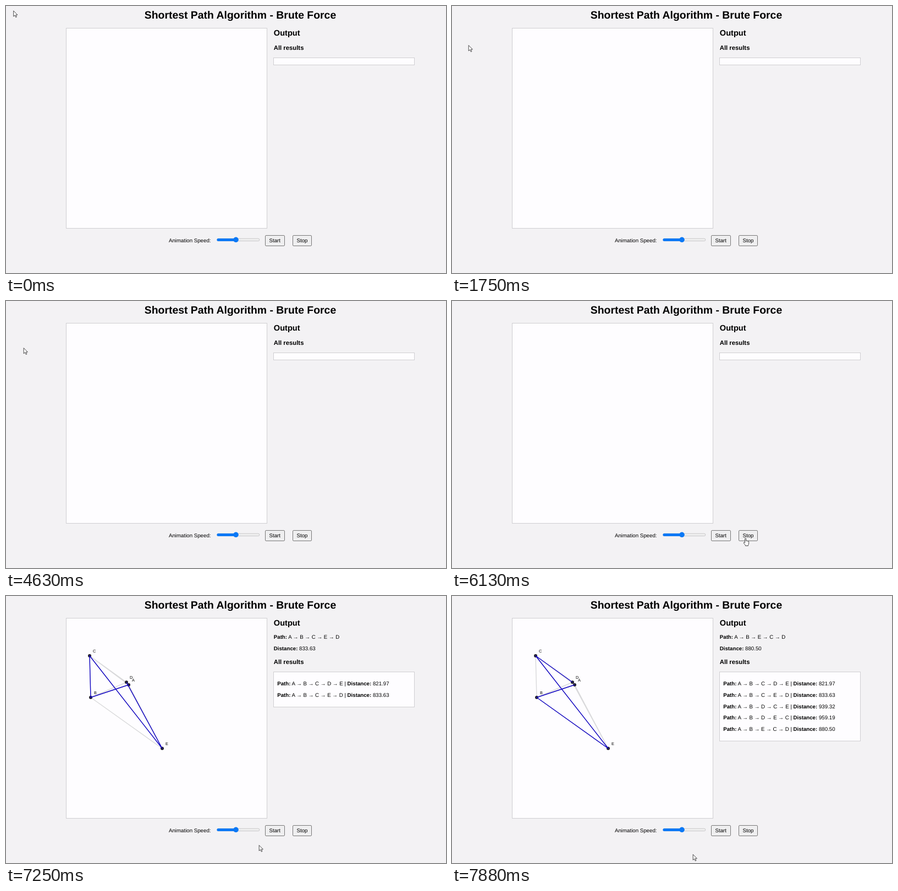
Animation of 800x487 px, one loop 8000 ms. Source, as an HTML page:

```html
<!DOCTYPE html>
<html lang="en">
<head>
<meta charset="utf-8">
<title>Shortest Path Algorithm - Brute Force</title>
<style>
  html, body { margin: 0; width: 100%; height: 100%; overflow: hidden; background: #f3f2f4; }
  svg { display: block; width: 800px; height: 487px; }
  text { font-family: "Liberation Sans", Arial, sans-serif; font-size: 9.7px; text-rendering: geometricPrecision; white-space: pre; }
  .h1 { font-size: 19.4px; font-weight: bold; text-anchor: middle; }
  .h2 { font-size: 14.6px; font-weight: bold; }
  .h3 { font-size: 11.3px; font-weight: bold; }
  .b { font-weight: bold; }
  .panel { fill: #fefdff; stroke: #cfced1; }
  .button rect { fill: #efeff0; stroke: #777; }
  .button text { text-anchor: middle; }
  .button.pressed rect { fill: #f5f5f6; stroke: #a0a0a0; }
  .edges { fill: none; stroke: #d9d9db; stroke-width: 1.4; }
  .route { fill: none; stroke: #1206c4; stroke-width: 1.4; stroke-linejoin: round; }
  .nodes circle { fill: #26242f; }
  .nodes text { font-size: 7.3px; }
  .cursor path { fill: #fff; stroke: #111; stroke-width: .75; stroke-linejoin: round; }
</style>
</head>
<body>
<svg viewBox="0 0 800 487">
  <text class="h1" x="426" y="23">Shortest Path Algorithm - Brute Force</text>
  <rect class="panel" x="109.5" y="40.5" width="365" height="365"/>

  <g id="graph">
    <path class="edges" id="edges"/>
    <g class="nodes" id="nodes"></g>
    <path class="route" id="route"/>
  </g>

  <text class="h2" x="486.8" y="54">Output</text>
  <g id="current">
    <text x="486.8" y="78.4" id="currentPath"></text>
    <text x="486.8" y="99.1" id="currentDistance"></text>
  </g>
  <g id="results">
    <text class="h3" x="486.8" y="80">All results</text>
    <rect class="panel" id="box" x="486.5" y="94.5" width="256"/>
    <g id="rows"></g>
  </g>

  <text x="296" y="431">Animation Speed:</text>
  <rect x="383.8" y="424.2" width="77" height="4.4" rx="2.2" fill="#efefef" stroke="#b5b5b7" stroke-width=".7"/>
  <rect x="383.4" y="423.9" width="34" height="5" rx="2.5" fill="#0b78f5"/>
  <circle cx="418" cy="426.3" r="4.8" fill="#0b78f5"/>
  <g class="button" id="start">
    <rect x="471.5" y="418.5" width="35" height="19" rx="1.6"/>
    <text x="488.8" y="431">Start</text>
  </g>
  <g class="button">
    <rect x="521.5" y="418.5" width="34" height="19" rx="1.6"/>
    <text x="538.5" y="431">Stop</text>
  </g>

  <g class="cursor" id="cursor">
    <path id="arrow" d="M.4.4V10.6L2.8 8.4 4.5 12.2 6.1 11.5 4.5 7.8H7.6Z"/>
    <path id="hand" d="M3 9V1.7a1 1 0 0 1 2 0V5.6q1-.8 1.9.2q1-.6 1.7.4q1.4-.3 1.4 1V10q0 2-1.2 3.2V14.5H3.8V13.4L.7 9.4q-.3-1.3 1-1.2Z"/>
  </g>
</svg>

<script>
const LOOP = 8000;
const ROW = 20.65;
const $ = id => document.getElementById(id);

const points = { A: [223, 162], B: [154, 185], C: [152, 109], D: [219, 157.3], E: [284, 278] };

// start time, route, distance
const runs = [
  [7130, "ABCDE", "821.97"],
  [7250, "ABCED", "833.63"],
  [7500, "ABDCE", "939.32"],
  [7630, "ABDEC", "959.19"],
  [7880, "ABECD", "880.50"],
];

// start time, x, y, shape
const poses = [
  [0, 13.3, 8.4, "arrow"],
  [130, 22, 22, "arrow"],
  [250, 90, 95, "arrow"],
  [380, 240, 220, "arrow"],
  [500, 410, 340, "arrow"],
  [630, 540, 402, "arrow"],
  [750, 588, 424, "arrow"],
  [880, 545, 419, "hand"],
  [1000, 24.3, 45.3, "arrow"],
  [1130, 27.3, 54.3, "arrow"],
  [1750, 29.8, 71.3, "arrow"],
  [2750, 31.6, 83.5, "arrow"],
  [4630, 31.8, 85.3, "arrow"],
  [4750, 0, 0, "none"],
  [6130, 529.6, 432, "hand"],
  [6250, 497, 424, "hand"],
  [6380, 459.5, 411.4, "arrow"],
  [6500, 476, 424, "hand"],
  [6750, 477.4, 426, "hand"],
  [7130, 470, 440, "arrow"],
  [7250, 459.8, 454.2, "arrow"],
  [7380, 447, 465, "arrow"],
  [7500, 440, 470, "arrow"],
  [7630, 437.8, 471, "arrow"],
];

const bold = s => `<tspan class="b">${s}</tspan>`;
const pathText = route => `${bold("Path:")} ${[...route].join(" → ")}`;
const distanceText = d => `${bold("Distance:")} ${d}`;
const line = names => "M" + [...names].map(n => points[n]).join("L");
const show = (el, on) => el.style.display = on ? "" : "none";

const names = Object.keys(points);
$("edges").setAttribute("d", names.flatMap((a, i) => names.slice(i + 1).map(b => line(a + b))).join(""));
$("nodes").innerHTML = names.map(n => {
  const [x, y] = points[n];
  return `<circle cx="${x}" cy="${y}" r="3"/><text x="${x + 6}" y="${y - 6}">${n}</text>`;
}).join("");
$("rows").innerHTML = runs.map(([, route, d], i) =>
  `<text x="493.2" y="${119.4 + i * ROW}">${pathText(route)} | ${distanceText(d)}</text>`).join("");

function showCursor(t) {
  const [, x, y, shape] = poses.filter(p => p[0] <= t).pop();
  $("cursor").setAttribute("transform", `translate(${x} ${y})`);
  show($("arrow"), shape === "arrow");
  show($("hand"), shape === "hand");
  $("start").classList.toggle("pressed", t >= 6880 && t < 7130);
}

function showRuns(count) {
  const started = count > 0;
  show($("graph"), started);
  show($("current"), started);
  $("results").setAttribute("transform", `translate(0 ${started ? 44 : 0})`);
  $("box").setAttribute("height", started ? Math.round(22.6 + count * ROW) : 13);
  [...$("rows").children].forEach((row, i) => show(row, i < count));
  if (!started) return;
  const [, route, d] = runs[count - 1];
  $("route").setAttribute("d", line(route));
  $("currentPath").innerHTML = pathText(route);
  $("currentDistance").innerHTML = distanceText(d);
}

let shown = -1;
const begin = performance.now();
function draw() {
  const t = (performance.now() - begin) % LOOP;
  const count = runs.filter(r => r[0] <= t).length;
  showCursor(t);
  if (count !== shown) showRuns(shown = count);
  requestAnimationFrame(draw);
}
draw();
</script>
</body>
</html>
```
